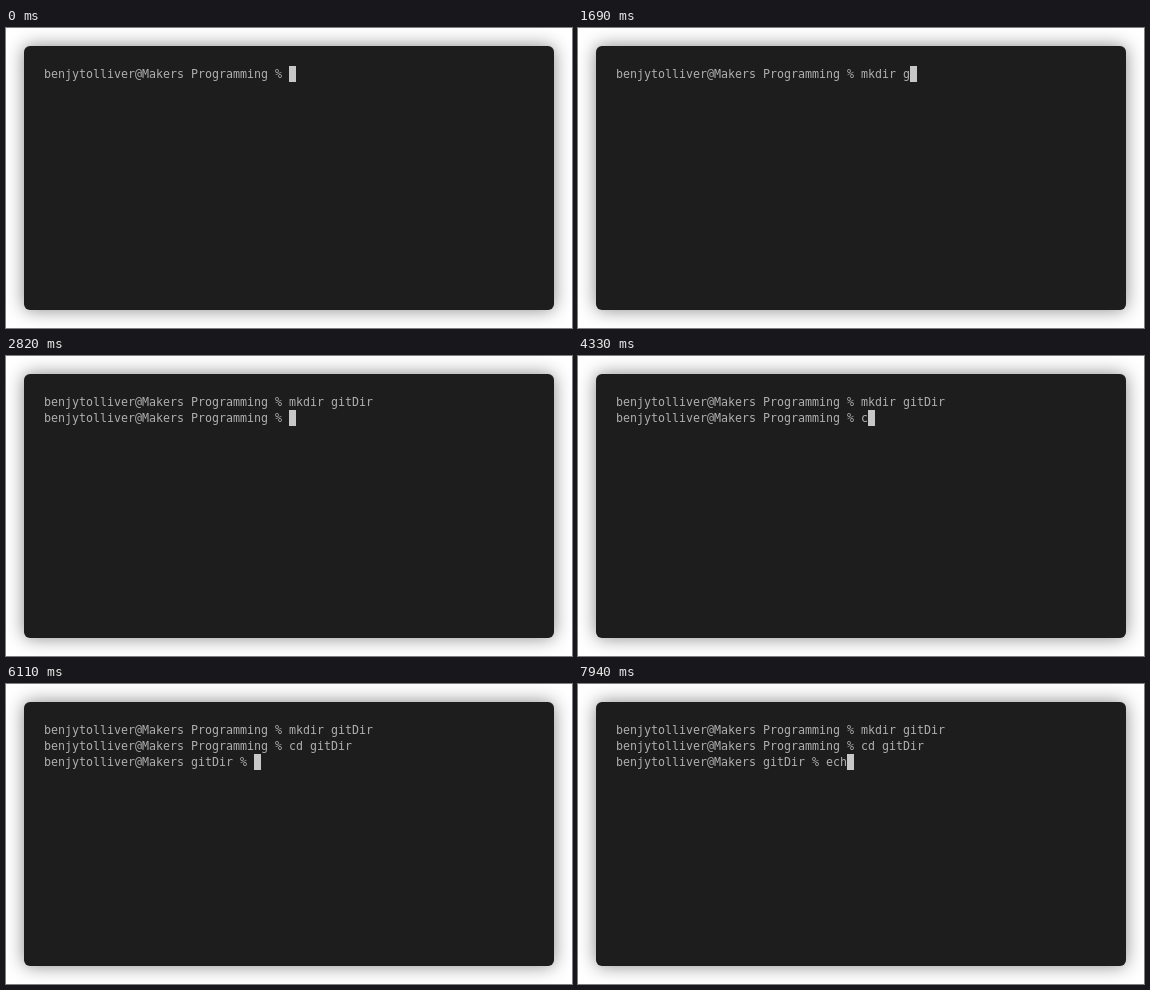
An HTML page that plays this animation: 566 px wide and 300 px high, repeating every 8 s.

```html
<!DOCTYPE html>
<html lang="en">
<head>
<meta charset="utf-8">
<title>Terminal</title>
<style>
  html, body {
    margin: 0;
    width: 566px;
    height: 300px;
    overflow: hidden;
    background: #fff;
  }
  #card {
    position: absolute;
    left: 18px;
    top: 18px;
    width: 530px;
    height: 264px;
    border-radius: 6px;
    background: #1d1d1d;
    box-shadow: 0 0 18px #888;
  }
  #screen {
    position: absolute;
    left: 20px;
    top: 20px;
    margin: 0;
    color: #afafaf;
    font: 11.63px/16px "DejaVu Sans Mono", monospace;
    font-variant-ligatures: none;
  }
  #cursor {
    position: absolute;
    width: 7px;
    height: 16px;
    background: #c7c7c7;
  }
</style>
</head>
<body>
<div id="card">
  <div id="cursor"></div>
  <pre id="screen"></pre>
</div>
<script>
const LOOP = 8000, CELL = 7, ROW = 16, PAD = 20;
const prompt = dir => `benjytolliver@Makers ${dir} % `;

// Each entry: time in ms, output; "\b" erases the previous character.
const output = [
  [0, prompt('Programming')],
  [500, 'm'], [600, 'k'], [700, 'd'], [790, 'i'],
  [940, 'r'], [1060, ' '],
  [1690, 'g'], [1760, 'i'], [1830, 't'],
  [2160, 'D'], [2280, 'i'], [2360, 'r'],
  [2720, '\n'], [2820, prompt('Programming')],
  [4330, 'c'], [4430, 'd'], [4520, ' '],
  [5230, 'g'], [5310, 'i'], [5380, 't'],
  [5590, 'Dir/'],
  [6110, '\b\n' + prompt('gitDir')],
  [7580, 'e'], [7840, 'c'], [7940, 'h']
];

const screen = document.getElementById('screen');
const cursor = document.getElementById('cursor');

function textAt(time) {
  return output
    .filter(([start]) => start <= time)
    .map(([, text]) => text)
    .join('')
    .replace(/.[\b]/g, '');
}

let shown = null;

function draw(time) {
  const text = textAt(time);
  if (text === shown) return;
  shown = text;
  const lines = text.split('\n');
  const row = lines.length - 1;
  screen.textContent = text;
  cursor.style.left = PAD + lines[row].length * CELL + 'px';
  cursor.style.top = PAD + row * ROW + 'px';
}

const origin = performance.now();

function tick() {
  draw((performance.now() - origin) % LOOP);
  requestAnimationFrame(tick);
}

draw(0);
requestAnimationFrame(tick);
</script>
</body>
</html>
```
